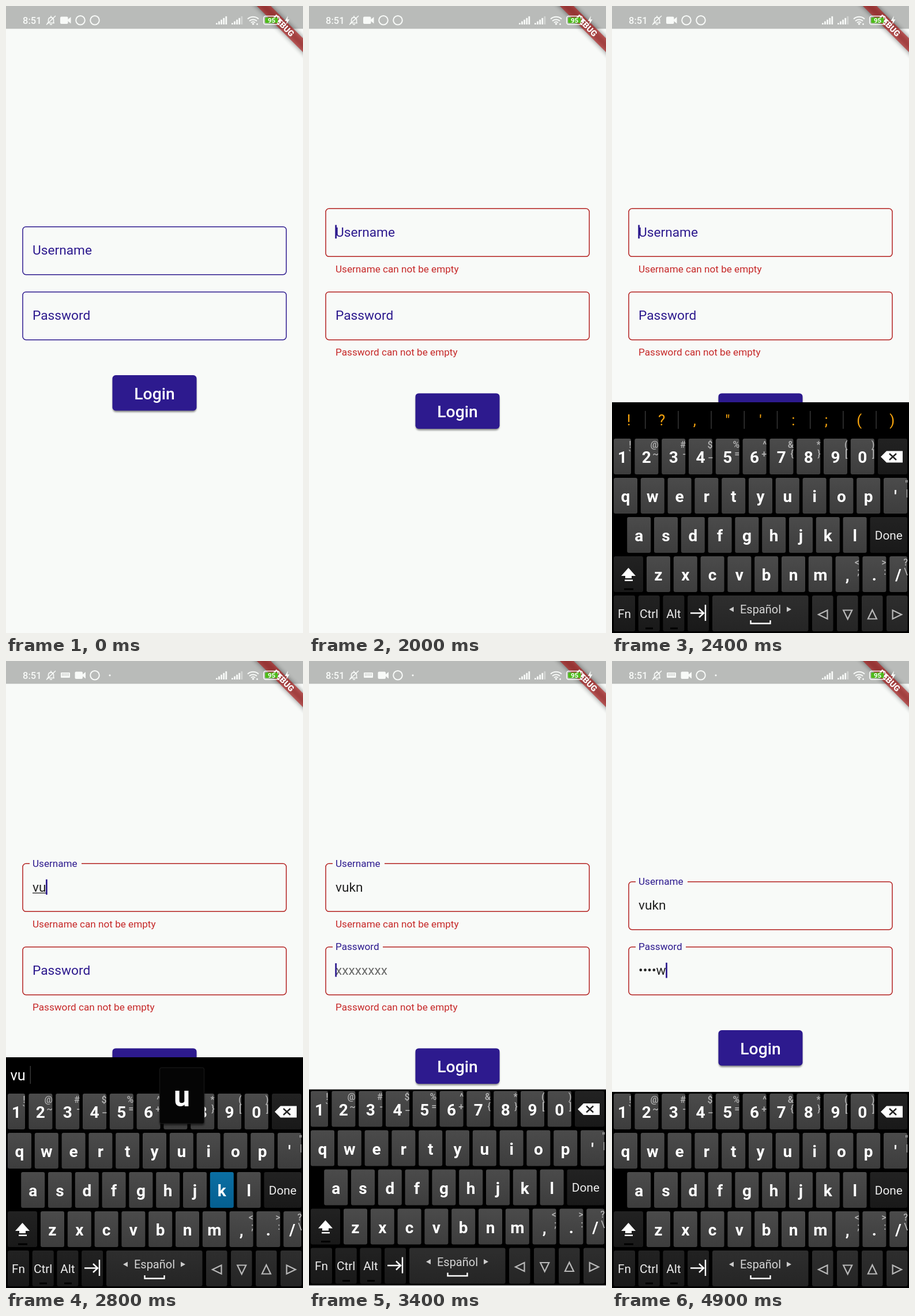
Recreate the animation shown at these times as an HTML page. Size 515 by 1087 pixels, loop 5 s.

```html
<!DOCTYPE html>
<html lang="en">
<head>
<meta charset="utf-8">
<title>Login form</title>
<style>
html, body { margin: 0; width: 100%; height: 100%; overflow: hidden; background: #f8faf8; }
svg { display: block; font-family: Roboto, "Noto Sans", sans-serif; }
text { white-space: pre; }
.label { fill: #2d1a8e; font-size: 22.7px; }
.value { fill: #222; font-size: 22.7px; }
.hint { fill: #222; font-size: 22.7px; }
.error { fill: #c62828; font-size: 17.15px; }
.mid { text-anchor: middle; }
.key { fill: #fff; font-size: 28px; font-weight: 700; text-anchor: middle; }
.word { fill: #eee; font-size: 20.8px; text-anchor: middle; }
.alt { fill: #b4b4b4; text-anchor: end; font-size: 16px; font-weight: 500; }
</style>
</head>
<body>
<svg id="stage" width="100%" height="100%" viewBox="0 0 515 1087">
  <defs>
    <linearGradient id="grey" x2="0" y2="1"><stop stop-color="#4b4b4b"/><stop offset="1" stop-color="#3d3d3d"/></linearGradient>
    <linearGradient id="dark" x2="0" y2="1"><stop stop-color="#222"/><stop offset="1" stop-color="#191919"/></linearGradient>
    <linearGradient id="dim" x2="0" y2="1"><stop stop-color="#2e2e2e"/><stop offset="1" stop-color="#252525"/></linearGradient>
    <linearGradient id="blue" x2="0" y2="1"><stop stop-color="#0b6fa3"/><stop offset="1" stop-color="#055f90"/></linearGradient>
    <filter id="soft" x="-20%" y="-60%" width="140%" height="220%"><feGaussianBlur stdDeviation="4"/></filter>
    <filter id="near" x="-10%" y="-20%" width="120%" height="150%"><feGaussianBlur stdDeviation="1.7"/></filter>
    <clipPath id="face"><rect x="184.5" y="0" width="146" height="61.5" rx="5.6"/></clipPath>
  </defs>
  <rect width="515" height="1087" fill="#f8faf8"/>
  <g id="form"></g>
  <svg id="board" x="0" y="1087" width="515" height="400">
    <rect width="515" height="400"/>
    <g id="marks"></g>
    <g id="word">
      <text id="guess" x="7.5" y="40" font-size="25.4" fill="#fff"></text>
      <path id="guessEnd" d="M0 15V46" stroke="#3a3a3a" stroke-width="1.4"/>
    </g>
    <g id="keys"></g>
  </svg>
  <g id="popup">
    <rect x="-39" y="2" width="78" height="98" rx="4" opacity=".5" filter="url(#near)"/>
    <rect x="-38.5" width="77" height="97" rx="3" fill="#050505" stroke="#1c1c1c"/>
    <text id="big" class="mid" y="67" font-size="50" font-weight="700" fill="#fff"></text>
  </g>
  <g id="status">
    <rect width="515" height="39.5" opacity=".255"/>
    <g transform="translate(515 0) rotate(45)">
      <rect x="-75" y="39.6" width="150" height="17" opacity=".5" filter="url(#soft)"/>
      <rect x="-75" y="39.6" width="150" height="17" fill="#b71c1c" fill-opacity=".63"/>
      <text class="mid" y="53.2" font-size="14.4" font-weight="900" fill="#fff">DEBUG</text>
    </g>
    <g id="icons" fill="#f8faf8">
      <text x="29" y="31" font-size="16.5" font-weight="500">8:51</text>
      <g fill="none" stroke="#f8faf8" stroke-width="1.6">
        <path d="M71 29.5H84M73.5 29V23.5A4.6 4.6 0 0 1 82.5 23.5V29M78 17V19M76 32H80M70 32.5L86 17"/>
        <circle cx="154" cy="24.8" r="7.8" stroke-width="2"/>
        <circle id="spare" cx="129" cy="24.8" r="7.8" stroke-width="2"/>
        <path d="M419 22.5A14 14 0 0 1 438 22.5M422 26A9.5 9.5 0 0 1 435 26M425 29A5 5 0 0 1 432 29" stroke-width="2"/>
        <rect x="446.8" y="17.5" width="27.5" height="14.5" rx="3.5"/>
      </g>
      <g id="camera"><rect y="18.5" width="13.5" height="12.5" rx="2"/><path d="M13 23.5L18.5 19V30.5L13 26Z"/></g>
      <g id="extra">
        <rect x="95" y="20" width="16" height="9" rx="1"/>
        <path d="M97 22.5H109M97 25H109" stroke="#999b99" stroke-dasharray="1.4 1.2"/>
        <circle cx="180" cy="24.8" r="1.6"/>
      </g>
      <circle cx="428.5" cy="31" r="1.8"/><circle cx="435.5" cy="31.5" r="1.4"/>
      <rect x="449.3" y="20" width="22" height="9.5" rx="1.5" fill="#4dbb19"/>
      <rect x="475" y="22" width="2.2" height="5.5" rx="1"/>
      <text class="mid" x="460.5" y="29" font-size="11.5" font-weight="700">95</text>
      <path d="M489 17L483.5 26H487L485.8 32.5L491.5 23.3H488Z"/>
    </g>
  </g>
</svg>
<script>
const $ = id => document.getElementById(id);
const LOOP = 5000, STEP = 100, PURPLE = '#2d1a8e', RED = '#b3201f';
const USER = 'vukn', PASS = 'whwhw';

function el(parent, tag, attrs, text) {
  const node = document.createElementNS('http://www.w3.org/2000/svg', tag);
  set(node, attrs);
  if (text !== undefined) node.textContent = text;
  return parent.appendChild(node);
}
function set(node, attrs) {
  for (const k in attrs) node.setAttribute(k, attrs[k]);
}
// Linear track through [time, value] pairs
function track(t, ...points) {
  let [t0, v0] = points[0];
  if (t <= t0) return v0;
  for (const [t1, v1] of points) {
    if (t < t1) return v0 + (v1 - v0) * (t - t0) / (t1 - t0);
    [t0, v0] = [t1, v1];
  }
  return v0;
}

// Signal strength
[[364, 5], [391, 4]].forEach(([x, full]) => {
  for (let i = 0; i < 5; i++) {
    const h = 2.5 + i * 2.9;
    el($('icons'), 'rect', { x: x + i * 4.1, y: 32 - h, width: 2.8, height: h, opacity: i < full ? 1 : .4 });
  }
});

// Form
function makeField(name, gap) {
  const g = el($('form'), 'g', {});
  const box = el(g, 'rect', { x: 29, y: .7, width: 457, height: 83, rx: 5.6, fill: 'none', 'stroke-width': 1.5 });
  const notch = el(g, 'rect', { x: 41, y: -1, height: 3.5, fill: '#f8faf8' });
  const label = el(g, 'text', { class: 'label' }, name);
  const hint = el(g, 'text', { class: 'hint', x: 46, y: 49 }, 'xxxxxxxx');
  const value = el(g, 'text', { class: 'value', x: 46, y: 49 });
  const line = el(g, 'rect', { x: 46, y: 51, height: 1.3, fill: '#222' });
  const caret = el(g, 'rect', { width: 2.7, fill: PURPLE });
  const error = el(g, 'text', { class: 'error', x: 46 }, name + ' can not be empty');
  return { g, box, notch, label, hint, value, line, caret, error, gap };
}
function drawField(f, s) {
  set(f.g, { transform: `translate(0 ${s.y})` });
  set(f.box, { stroke: s.color });
  set(f.notch, { width: f.gap * s.float });
  set(f.label, { transform: `translate(46 ${49 - 43 * s.float}) scale(${1 - .245 * s.float})` });
  set(f.hint, { opacity: s.hint });
  f.value.textContent = s.text;
  const w = s.text ? f.value.getComputedTextLength() : 0;
  set(f.line, { width: s.underline ? w : 0 });
  set(f.caret, {
    x: w ? 45.5 + w : 45.3, y: w ? 28 : 29, height: w ? 26.5 : 23.5, opacity: s.focus ? 1 : 0
  });
  set(f.error, { y: 107 + 4 * s.error + 0, opacity: s.error });
}
const user = makeField('Username', 90), pass = makeField('Password', 87);

const button = el($('form'), 'g', {});
const glow = el(button, 'rect', { x: 185, y: 3, width: 145, height: 61, rx: 6, opacity: .45, filter: 'url(#near)' });
el(button, 'rect', { x: 184.5, y: 0, width: 146, height: 61.5, rx: 5.6, fill: PURPLE });
const ripple = el(el(button, 'g', { 'clip-path': 'url(#face)' }), 'circle', { cx: 257.5, cy: 31, fill: '#fff' });
el(button, 'text', { class: 'mid', x: 257.5, y: 41.5, 'font-size': 28.3, 'font-weight': 500, fill: '#fff' }, 'Login');

// Keyboard
const keys = {}, pad = $('keys'), PITCH = 46.8;
function key(row, x, w, name, fill = 'grey', style = 'key') {
  const y = 3 + 68 * row;
  const rect = el(pad, 'rect', { x, y, width: w, height: 62, rx: 3, fill: `url(#${fill})` });
  el(pad, 'text', { class: style, x: x + w / 2, y: y + (style === 'key' ? 42 : 38.5) }, name);
  if (name) keys[name] = { rect, x: x + w / 2, y };
}
function alts(row, right, top, low) {
  const y = 3 + 68 * row;
  el(pad, 'text', { class: 'alt', x: right, y: y + 15.5 }, top);
  el(pad, 'text', { class: 'alt', x: right, y: y + 32, 'font-size': 14 }, low);
}
[...'1234567890'].forEach((c, i) => {
  const x = i ? 39.4 + PITCH * (i - 1) : 3, w = i ? 41 : 30;
  key(0, x, w, c);
  alts(0, x + w + .5, '!@#$%^&*()'[i], '`~-_=+{}[]'[i]);
});
[['qwertyuiop\'', 3], ['asdfghjkl', 26.2], ['zxcvbnm,./', 60]].forEach(([chars, x0], r) => {
  [...chars].forEach((c, i) => {
    const x = x0 + PITCH * i;
    key(r + 1, x, Math.min(41, 512 - x), c);
  });
});
alts(1, 513.5, '"', '|');
alts(3, 429, '<', ';');
alts(3, 475.5, '>', ':');
alts(3, 513, '?', '\\');
key(0, 461, 51, '', 'dark');
key(2, 447.5, 64.5, 'Done', 'dark', 'word');
key(3, 3, 51, '', 'dark');
['Fn', 'Ctrl', 'Alt', ''].forEach((c, i) => key(4, 3 + 42.7 * i, 37, c, 'dark', 'word'));
key(4, 174, 166.5, '', 'dim');
el(pad, 'text', { class: 'word', x: 257.5, y: 306, style: 'font-size:20px;fill:#d5d5d5' }, 'Español');
for (let i = 0; i < 4; i++) {
  key(4, 347 + 43 * i, 36.5, '', 'dim');
  el(pad, 'path', {
    d: 'M-8 0L7.5 -7.5V7.5Z', fill: 'none', stroke: '#b8b8b8', 'stroke-width': 2.2,
    transform: `translate(${366 + 42.7 * i} 308) rotate(${[0, 270, 90, 180][i]})`
  });
}
el(pad, 'path', { fill: '#fff', d: 'M466 34.5L476 24.5H504V44.5H476ZM28.5 227L41 241H34V245H23V241H16ZM22 247.5H36V250H22Z' });
el(pad, 'path', { fill: 'none', stroke: '#222', 'stroke-width': 2.4, d: 'M481 29L493 40M493 29L481 40' });
el(pad, 'path', { fill: 'none', stroke: '#fff', 'stroke-width': 2.4, d: 'M136 305.5H159M151 298L159 305.5L151 313M162 291V319M240.5 318V323.5H274.5V318' });
el(pad, 'path', { fill: '#ccc', d: 'M203 299L211 294.5V303.5ZM311 299L303 294.5V303.5Z' });
el(pad, 'path', { stroke: '#000', 'stroke-width': 3, d: 'M21 264H37M58 332H71M101 332H114' });

[...'!?,"\':;()'].forEach((c, i) => {
  el($('marks'), 'text', { class: 'mid', x: 29 + 57.1 * i, y: 40, 'font-size': 26, fill: '#f5a30d' }, c);
  if (i) el($('marks'), 'path', { d: `M${.5 + 57.2 * i} 15V46`, stroke: '#3a3a3a', 'stroke-width': 1.4 });
});

// Each key lights up one step before its letter lands, then its bubble shows
function typed(t, start, word) {
  const n = Math.floor((t - start) / STEP);
  const count = Math.max(0, Math.min(word.length, n));
  return { count, lit: word[n], bubble: n > word.length ? '' : word[n - 1] };
}

function draw(t) {
  const a = typed(t, 2600, USER), b = typed(t, 3800, PASS);
  const failed = t >= 500 && t < 4900;
  const error = failed ? track(t, [400, 0], [700, 1]) : 0;
  const color = t >= 500 ? RED : PURPLE;
  const shift = failed ? 31.4 : 0;
  const inPass = t >= 3300;

  drawField(user, {
    y: 382 - shift, color, error, text: USER.slice(0, a.count), hint: 0,
    float: track(t, [2600, 0], [2800, 1]), focus: t >= 2000 && !inPass, underline: !inPass
  });
  const dots = b.count ? '•'.repeat(b.count - 1) + PASS[b.count - 1] : '';
  drawField(pass, {
    y: 495, color, error, text: dots, float: track(t, [3200, 0], [3400, 1]), focus: inPass, underline: false,
    hint: track(t, [3200, 0], [3400, .66], [3800, .66], [3900, .42], [4000, .18], [4100, 0])
  });

  set(button, { transform: `translate(0 ${640 + shift})` });
  set(ripple, {
    r: track(t, [100, 0], [500, 80]),
    opacity: track(t, [100, 0], [200, .2], [600, .2], [900, 0])
  });
  set(glow, { y: track(t, [100, 3], [300, 6], [600, 6], [800, 3]) });

  const narrow = t >= 3200, bar = t < 3300;
  set($('board'), {
    y: t < 3200 ? track(t, [2000, 1087], [2100, 960], [2200, 810], [2300, 718], [2400, 687])
      : track(t, [3200, 687], [3300, 722], [3400, 742.5], [3500, 747]),
    height: narrow ? 340 : 400
  });
  set(pad, { transform: `translate(0 ${bar ? 60 : 0})` });
  set($('marks'), { opacity: bar && !a.count ? 1 : 0 });
  set($('word'), { opacity: bar && a.count ? 1 : 0 });
  $('guess').textContent = USER.slice(0, a.count);
  if (a.count) set($('guessEnd'), { transform: `translate(${16 + $('guess').getComputedTextLength()} 0)` });

  const lit = a.lit || b.lit, bubble = keys[(bar ? a : b).bubble];
  for (const c of new Set(USER + PASS)) set(keys[c].rect, { fill: `url(#${c === lit ? 'blue' : 'grey'})` });
  set($('popup'), { opacity: bubble ? 1 : 0 });
  if (bubble) {
    $('big').textContent = (bar ? a : b).bubble;
    set($('popup'), { transform: `translate(${bubble.x + .8} ${747 + bubble.y - 113})` });
  }

  const ime = t >= 2600;
  set($('extra'), { opacity: ime ? 1 : 0 });
  set($('spare'), { opacity: ime ? 0 : 1 });
  set($('camera'), { transform: `translate(${ime ? 119.5 : 94} 0)` });
}

let start = performance.now(), last = -1;
function tick(now) {
  const t = Math.floor(Math.max(0, now - start) % LOOP / STEP) * STEP;
  if (t !== last) draw(last = t);
  requestAnimationFrame(tick);
}
draw(0);
requestAnimationFrame(tick);
</script>
</body>
</html>
```
